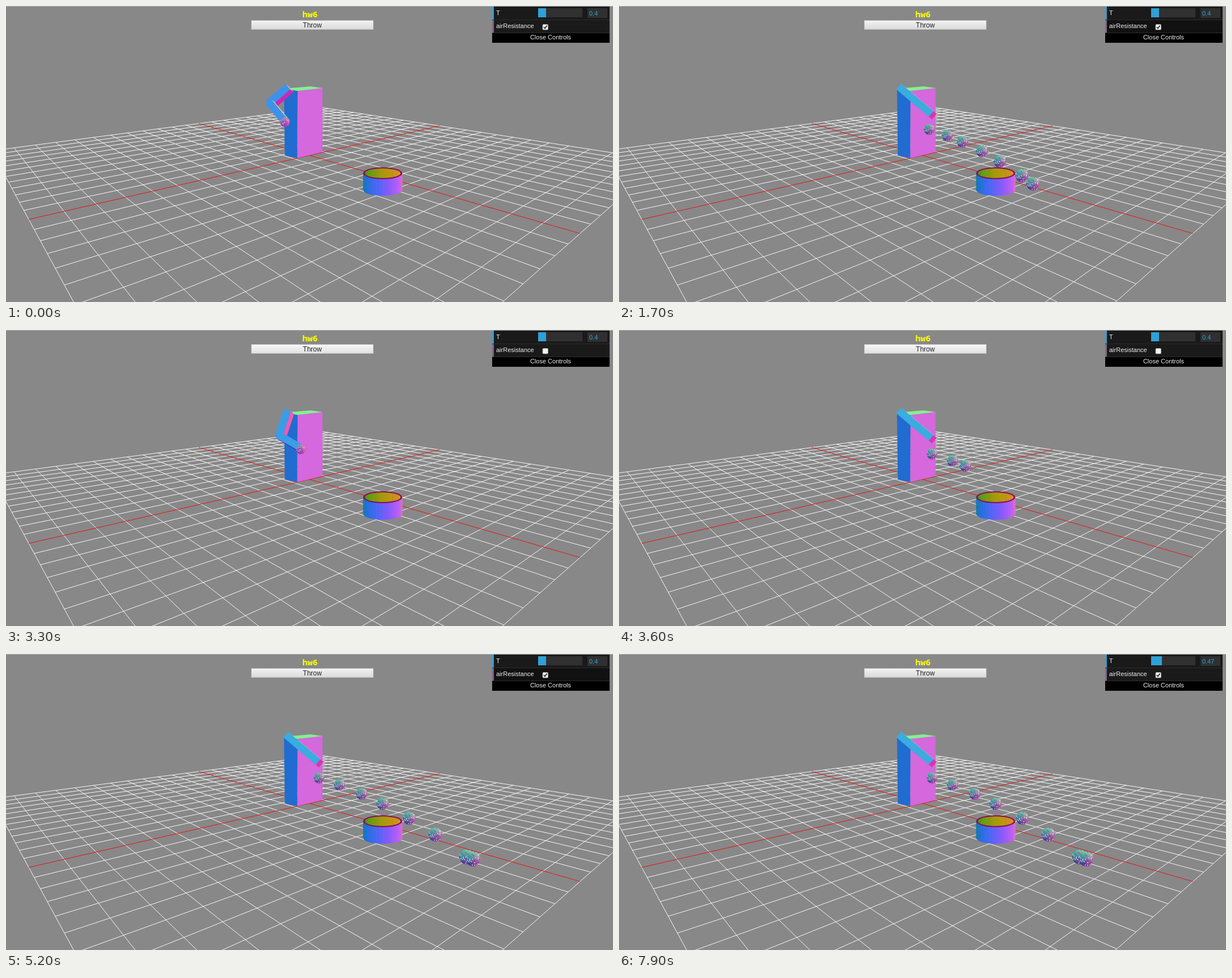
Write an HTML page that moves like this. It is 1070 by 523 pixels and loops after 8000 ms.

```html
<!DOCTYPE html>
<html lang="en">
<head>
<meta charset="utf-8">
<title>Throwing arm</title>
<style>
  html, body { margin: 0; width: 100%; height: 100%; overflow: hidden; background: #888; }
  svg { display: block; width: 1070px; height: 523px; }
  text { font: 11px "Liberation Sans", Arial, sans-serif; fill: #eee; }
  #title { font: bold 15px "Noto Sans Mono", "DejaVu Sans Mono", monospace; fill: #ff0; }
  #label { font-size: 12px; fill: #222; }
  #value { fill: #2fa1d6; }
</style>
</head>
<body>
<svg viewBox="0 0 1070 523">
  <defs>
    <clipPath id="disc"><circle r="10"/></clipPath>
    <clipPath id="mouth"><ellipse cx="664" cy="295.5" rx="31.5" ry="8.5"/></clipPath>
    <linearGradient id="plain" x2="0" y2="1"><stop stop-color="#f3f3f3"/><stop offset="1" stop-color="#d9d9d9"/></linearGradient>
    <linearGradient id="lit" x2="0" y2="1"><stop stop-color="#f8f8f8"/><stop offset="1" stop-color="#e0e0e0"/></linearGradient>
    <g id="ball" clip-path="url(#disc)"></g>
    <g id="held" clip-path="url(#disc)"></g>
  </defs>
  <rect width="1070" height="523" fill="#888"/>
  <rect width="1070" height="1" fill="#b0b0b0"/>
  <path id="grid" fill="none" stroke="#f6f6f6"/>
  <path id="axes" fill="none" stroke="#e81414"/>
  <polygon points="490,146 514,150 513.5,269 491.5,264" fill="#206cd0"/>
  <polygon points="514,150 558,145 558,258 513.5,269" fill="#d468dc"/>
  <polygon points="490,146 537,142 558,145 514,150" fill="#84f090"/>
  <g id="cup"></g>
  <g id="scene"></g>

  <text id="title" x="536" y="20" text-anchor="middle">hw6</text>
  <rect id="button" x="432.5" y="25.5" width="215" height="16" stroke="#b4b4b4"/>
  <text id="label" x="540" y="37.5" text-anchor="middle">Throw</text>

  <rect x="857" y="1" width="207" height="64" fill="#000"/>
  <rect x="860" y="1" width="204" height="23" fill="#1a1a1a"/>
  <rect x="857" y="1" width="3" height="23" fill="#2fa1d6"/>
  <rect x="857" y="24" width="207" height="1" fill="#2c2c2c"/>
  <rect id="row" x="860" y="25" width="204" height="22"/>
  <rect x="857" y="25" width="3" height="22" fill="#806787"/>
  <rect x="857" y="47" width="207" height="1" fill="#2c2c2c"/>
  <text x="864" y="16">T</text>
  <rect x="938" y="4" width="78" height="16" fill="#303030"/>
  <rect id="slider" x="938" y="4" height="16"/>
  <rect x="1025" y="4" width="35" height="17" fill="#303030"/>
  <text id="value" x="1028" y="17"></text>
  <text x="864" y="39">airResistance</text>
  <rect x="946" y="32.5" width="9.5" height="9.5" rx="1.5" fill="#f2f2f2" stroke="#999" stroke-width=".8"/>
  <path id="tick" d="M948 37.3l2 2.2 3.6-5" fill="none" stroke="#222" stroke-width="1.7"/>
  <text x="960" y="59" text-anchor="middle">Close Controls</text>
</svg>
<script>
const el = id => document.getElementById(id);
const clamp = (v, lo, hi) => Math.min(hi, Math.max(lo, v));
const mix = (a, b, k) => a.map((v, i) => v + (b[i] - v) * k);
const rgb = c => `rgb(${c.map(v => clamp(Math.round(v), 0, 255))})`;
const poly = (pts, fill) =>
  `<polygon points="${pts.map(p => p.map(v => v.toFixed(2))).join(" ")}" fill="${fill}"/>`;

// Ground plane in perspective, u and v from -1 to 1
function ground(u, v) {
  const depth = 1 - .4196 * u - .3674 * v;
  return [535 + (276.8 * u - 313.1 * v) / depth, 264 + (80.1 * u + 71.5 * v) / depth]
    .map(n => n.toFixed(2));
}

function drawGrid() {
  const HALF = 12;
  const pair = k => `M${ground(k, -1)}L${ground(k, 1)}M${ground(-1, k)}L${ground(1, k)}`;
  let d = "";
  for (let i = -HALF; i <= HALF; i++) if (i) d += pair(i / HALF);
  el("grid").setAttribute("d", d);
  el("axes").setAttribute("d", pair(0));
}

// Colour along a list of evenly spaced stops
function ramp(stops, k) {
  const p = clamp(k, 0, .9999) * (stops.length - 1), i = Math.floor(p);
  return rgb(mix(stops[i], stops[i + 1], p - i));
}

function drawCup() {
  const N = 18, X = 664, RX = 34.5, RY = 10.5, TOP = 295.5, BASE = 325;
  const outside = [[8, 126, 150], [32, 112, 216], [72, 104, 244], [136, 90, 250], [190, 94, 248], [232, 118, 184]];
  const inside = [[28, 144, 44], [92, 158, 16], [168, 152, 12], [206, 148, 24], [246, 146, 72]];
  let wall = "", lining = "";
  for (let i = 0; i < N; i++) {
    const a = Math.PI * i / N, b = Math.PI * (i + 1) / N, k = (i + .5) / N;
    const [x0, x1] = [a, b].map(t => X - RX * Math.cos(t));
    const [d0, d1] = [a, b].map(t => RY * Math.sin(t));
    wall += poly([[x0, TOP], [x1 + .3, TOP], [x1 + .3, BASE + d1], [x0, BASE + d0]], ramp(outside, k));
    lining += poly([[x0, 280], [x1 + .3, 280], [x1 + .3, 310], [x0, 310]], ramp(inside, k));
  }
  el("cup").innerHTML = wall +
    `<ellipse cx="${X}" cy="${TOP}" rx="${RX}" ry="${RY}" fill="#8a0c58"/>` +
    `<g clip-path="url(#mouth)">${lining}</g>`;
}

// Speckled sphere of radius 10, coloured by its surface direction
function drawBall(id, seed, base, slope) {
  const rand = () => (seed = seed * 16807 % 2147483647) / 2147483647;
  const STEP = 1.6;
  let out = `<circle r="10" fill="${rgb(base)}"/>`;
  for (let y = -10; y < 10; y += STEP)
    for (let x = -10; x < 10; x += STEP) {
      const nx = (x + .8) / 10, ny = (y + .8) / 10;
      let c = [base[0] + slope[0] * nx, base[1] - slope[1] * ny, base[2] + slope[2] * (nx - ny)];
      const r = rand();
      if (r > .88) c = mix(c, [245, 240, 245], .65);
      else if (r < .2) c = mix(c, [60, 70, 150], .5);
      out += `<rect x="${x.toFixed(1)}" y="${y.toFixed(1)}" width="1.7" height="1.7" fill="${rgb(c)}"/>`;
    }
  el(id).innerHTML = out;
}

const useBall = (id, x, y, r) =>
  `<use href="#${id}" transform="translate(${x.toFixed(2)} ${y.toFixed(2)}) scale(${(r / 10).toFixed(3)})"/>`;

// Progress of the swing, then elbow and hand positions
const SHOULDER = [495, 144];
const POSES = [
  [0, 464, 171, 488, 200],
  [.41, 481, 186, 516, 206],
  [.67, 503, 186, 543, 208],
  [.92, 520, 170, 545, 196],
  [1, 522, 167, 548, 189]
];

function poseAt(s) {
  s = clamp(s, 0, 1);
  const i = Math.max(1, POSES.findIndex(p => p[0] >= s));
  const a = POSES[i - 1], b = POSES[i];
  return mix(a, b, (s - a[0]) / (b[0] - a[0])).slice(1);
}

// A box seen from the side: front face plus the sides that face the viewer
function limb([x0, y0], [x1, y1], fill) {
  const W = 6.5, EXT = 2.5, OFF = [6, 4.7];
  const len = Math.hypot(x1 - x0, y1 - y0);
  const dx = (x1 - x0) / len, dy = (y1 - y0) / len;
  const at = (x, y, along, side) => [x + dx * along - dy * side, y + dy * along + dx * side];
  const face = [at(x0, y0, -EXT, -W), at(x1, y1, EXT, -W), at(x1, y1, EXT, W), at(x0, y0, -EXT, W)];
  const push = p => [p[0] + OFF[0], p[1] + OFF[1]];
  let out = "";
  face.forEach((p, i) => {
    const q = face[(i + 1) % 4];
    const n = Math.atan2(p[0] - q[0], q[1] - p[1]);
    if (Math.cos(n) * OFF[0] + Math.sin(n) * OFF[1] <= 0) return;
    out += poly([p, q, push(q), push(p)], rgb([128 + 115 * Math.cos(n), 128 - 115 * Math.sin(n), 178]));
  });
  return out + poly(face, fill);
}

// Times in ms; path terms give x over time and y over x; trail in tenths of a second
const THROWS = [
  { start: 740, release: 1050, x: 547, y: 218, run: [25.4, .42], fall: [.301, .00122],
    end: 7.9, floor: 350, trail: [0, 1.22, 2.23, 3.46, 4.56, 5.86, 7.1] },
  { start: 3140, release: 3407, x: 552, y: 219, run: [28, 1.26], fall: [.308, .00088],
    end: 7.3, floor: 362, trail: [0, 1.22, 2.42, 3.46, 4.69, 5.8, 7.05] }
];

function flying(th, tau) {
  const t = Math.min(tau, th.end);
  const k = th.run[0] * t + th.run[1] * t * t;
  const y = Math.min(th.floor, th.y + th.fall[0] * k + th.fall[1] * k * k);
  return useBall("ball", th.x + k, y, 9.5 + (y - 218) / 40);
}

function drawScene(t) {
  const th = THROWS[t < 3200 ? 0 : 1];
  const s = clamp((t - th.start) / 390, 0, 1);
  const [ex, ey, hx, hy] = poseAt(s);
  const blue = rgb(mix([60, 146, 234], [58, 172, 224], s));
  let out = limb(SHOULDER, [ex, ey], blue) + limb([ex, ey], [hx, hy], blue);
  const tau = (t - th.release) / 100;
  if (tau < 0) out += useBall("held", hx + 3.5, hy + 5, 8.5);
  else {
    for (const mark of th.trail) if (mark <= tau) out += flying(th, mark);
    out += flying(th, tau);
  }
  el("scene").innerHTML = out;
}

function drawControls(t) {
  const within = (...spans) => spans.some(([a, b]) => t >= a && t < b);
  const set = (id, key, v) => el(id).setAttribute(key, v);
  set("button", "fill", within([200, 1500], [2800, 4400], [7200, 7500]) ? "url(#lit)" : "url(#plain)");
  set("row", "fill", within([1600, 2600], [4600, 5600], [7600, 7900]) ? "#111" : "#1a1a1a");
  set("tick", "visibility", within([2400, 5200]) ? "hidden" : "visible");
  set("slider", "fill", within([5700, 6900]) ? "#44abda" : "#2fa1d6");
  set("slider", "width", t < 6700 ? 14 : 19);
  el("value").textContent = t < 6700 ? "0.4" : "0.47";
}

drawGrid();
drawCup();
drawBall("ball", 71, [118, 122, 158], [92, 92, 14]);
drawBall("held", 29, [176, 96, 178], [66, 62, 0]);

const LOOP = 8000, TICK = 100;
const begin = performance.now();
let shown = -1;
function frame() {
  const now = Math.max(0, performance.now() - begin) % LOOP;
  const t = Math.floor(now / TICK) * TICK;
  if (t !== shown) {
    shown = t;
    drawScene(t);
    drawControls(t);
  }
  requestAnimationFrame(frame);
}
frame();
</script>
</body>
</html>
```
